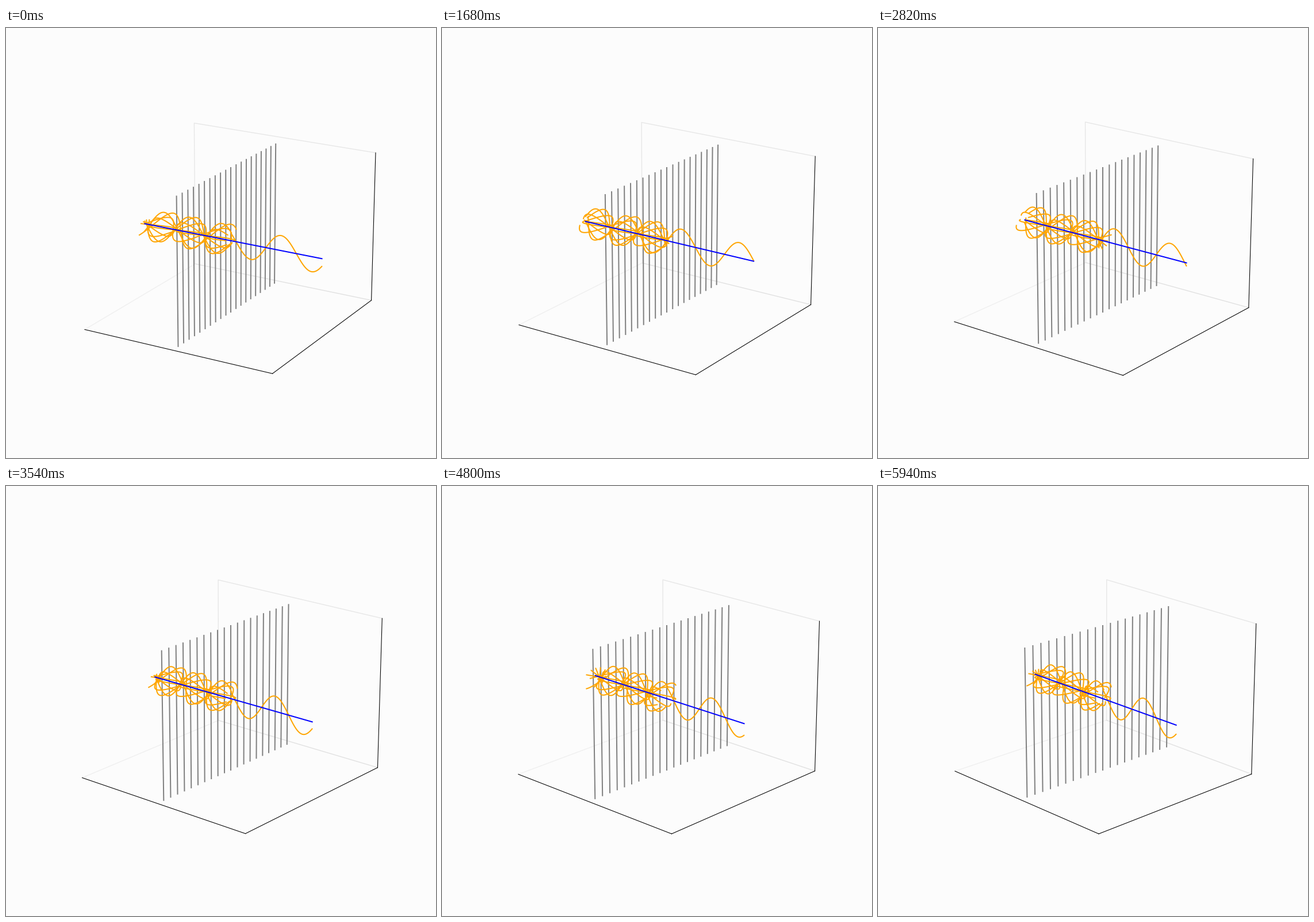
A matplotlib script that plays this animation: 748 by 748 pixels, repeating every 6 s.

```python
import numpy as np
import matplotlib.pyplot as plt
from matplotlib.animation import FuncAnimation

SIZE, DPI = 748, 96
FRAMES, INTERVAL = 100, 60
CENTER = (391.3, 370.0)
SCALE, DIST = 3111.6, 10
ELEV = np.radians(20)
AZIM0, AZIM_STEP = -60, 1 / 6        # degrees, degrees per frame
UNIT = np.array([0.05714, 0.05714, 0.04286])
BOX = 10 * 25 / 24                   # half size of the axes box

AMP = 2.05
K = 2 * np.pi * 3 / 20
OMEGA = 0.3184                       # radians per frame
START = K * 5.575
ANGLES = np.radians(13 + 36 * np.arange(10))
SHIFTS = [0.52, -0.33, 0, -0.1, 0, 0.1, 0.29, 0.37, 0.33, 0.18]

fig = plt.figure(figsize=(SIZE / DPI, SIZE / DPI), dpi=DPI, facecolor="#fcfcfc")
ax = fig.add_axes([0, 0, 1, 1])
ax.set_xlim(0, SIZE)
ax.set_ylim(SIZE, 0)
ax.axis("off")


def project(points, azim):
    """Perspective view of (n, 3) data points, in pixels."""
    x, y, z = (points * UNIT).T
    c, s = np.cos(azim), np.sin(azim)
    ce, se = np.cos(ELEV), np.sin(ELEV)
    toward = c * x + s * y
    f = SCALE / (DIST - ce * toward - se * z)
    return (CENTER[0] + f * (c * y - s * x),
            CENTER[1] - f * (ce * z - se * toward))


def corners(*signs):
    return BOX * np.array(signs, float)


def wave(x, angle, shift, i):
    e = AMP * np.cos(K * x - START - OMEGA * i + shift)
    return np.column_stack([x, e * np.cos(angle), e * np.sin(angle)])


fixed = []     # (line, points) pairs that only turn with the view
waves = []     # (line, x, angle, shift)


def add_line(color, width):
    return ax.plot([], [], color=color, lw=width)[0]


def add_fixed(points, color, width):
    fixed.append((add_line(color, width), points))


# back wall and floor edges, then the three axis lines
add_fixed(corners((-1, -1, -1), (-1, 1, -1)), "#efefef", 1)
add_fixed(corners((-1, 1, -1), (-1, 1, 1), (1, 1, 1)), "#e6e6e6", 1)
add_fixed(corners((-1, 1, -1), (1, 1, -1)), "#e0e0e0", 1)
add_fixed(corners((-1, -1, -1), (1, -1, -1)), "black", 0.8)
add_fixed(corners((1, -1, -1), (1, 1, -1)), "black", 0.8)
add_fixed(corners((1, 1, -1), (1, 1, 1)), "black", 0.8)

# polarising grid
for y in range(-10, 10):
    add_fixed(np.array([(0, y, -10), (0, y, 10)], float), "gray", 1.5)

# mixed waves before the grid, one vertical wave after it
for angle, shift in zip(ANGLES, SHIFTS):
    waves.append((add_line("orange", 1.5), np.linspace(-10, 0, 100), angle, shift))
waves.append((add_line("orange", 1.5), np.linspace(0, 10, 100), np.pi / 2, 0))

add_fixed(np.array([(-10, 0, 0), (10, 0, 0)], float), "blue", 1.5)


def update(i):
    azim = np.radians(AZIM0 + AZIM_STEP * i)
    for line, points in fixed:
        line.set_data(*project(points, azim))
    for line, x, angle, shift in waves:
        line.set_data(*project(wave(x, angle, shift, i), azim))
    return []


anim = FuncAnimation(fig, update, frames=FRAMES, interval=INTERVAL,
                     repeat=True, repeat_delay=0, init_func=lambda: update(0))
plt.show()
```
